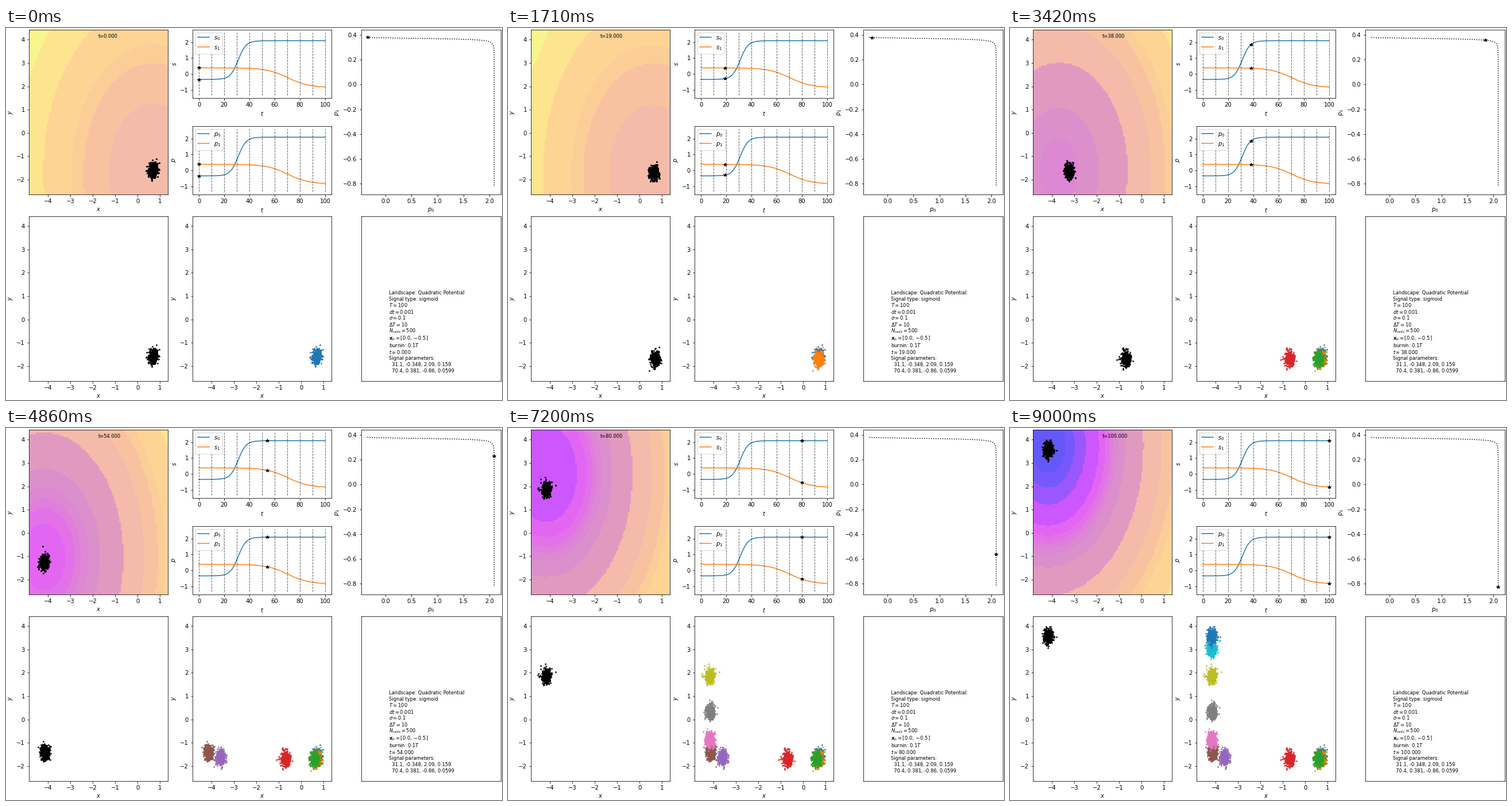
Write a matplotlib script that moves like this. It is 864 px wide and 648 px high and loops after 9.09 s.

```python
import numpy as np
import matplotlib.pyplot as plt
from matplotlib.animation import FuncAnimation
from matplotlib.colors import BoundaryNorm, ListedColormap

W, H, DPI = 864, 648, 72
T, N_CELLS, SIGMA, SAVE_EVERY, BURNIN = 100, 500, 0.1, 10, 10
STIFF = np.array([1 / 2, 2 / 9])
SIGNALS = [(31.1, -0.348, 2.09, 0.159), (70.4, 0.381, -0.86, 0.0599)]
XLIM, YLIM = (-4.86, 1.36), (-2.64, 4.43)
SMALL = 8.33

LEVELS = [-99, -5.75, -5.55, -5.2, -4.6, -4.25, -4.0, -3.8, -3.5, -2.9,
          -1.35, 0.53, 2.0, 2.9, 5.6, 9.0, 99]
BANDS = ["#6458f8", "#7758fc", "#9a57fe", "#cc57ff", "#e366f3", "#e372e8",
         "#e07edc", "#dc88d2", "#dc90cb", "#e19abf", "#e8a5b6", "#f4baaa",
         "#f8c3a0", "#fbcd98", "#fde48f", "#f9f58e"]
BANDS[11:] = ["#f4baaa", "#f8c2a0", "#fbce98", "#fdd494", "#fde48f", "#f9f58e"]
BANDS = BANDS[:10] + BANDS[11:]


def signal(t):
    """Sigmoidal signals at time t, stacked on the last axis."""
    return np.stack([a + (b - a) * 0.5 * (1 + np.tanh(r * (t - tc)))
                     for tc, a, b, r in SIGNALS], axis=-1)


def simulate(h=0.1):
    """Cell positions at t = 0, 1, ..., T, after a burn-in at the first signal."""
    rng = np.random.default_rng(5)
    decay = np.exp(-STIFF * h)
    noise = SIGMA * np.sqrt((1 - decay ** 2) / (2 * STIFF))
    cells = np.tile([0.0, -0.5], (N_CELLS, 1))
    states = []
    per_unit = round(1 / h)
    for i in range(-BURNIN * per_unit, T * per_unit + 1):
        if i >= 0 and i % per_unit == 0:
            states.append(cells)
        goal = -signal(max(i * h, 0.0)) / STIFF
        cells = goal + (cells - goal) * decay + noise * rng.standard_normal(cells.shape)
    return states


def potential(t):
    p = signal(t)
    return gx ** 2 / 4 + gy ** 2 / 9 + p[0] * gx + p[1] * gy


def panel(left, top, right, bottom, xlabel="", ylabel=""):
    ax = fig.add_axes([left / W, 1 - bottom / H, (right - left) / W, (bottom - top) / H])
    ax.set_xlabel(xlabel)
    ax.set_ylabel(ylabel)
    return ax


def plane(left, top, right, bottom):
    ax = panel(left, top, right, bottom, "$x$", "$y$")
    ax.set(xlim=XLIM, ylim=YLIM)
    return ax


def dots(ax, color, alpha=1.0):
    return ax.plot([], [], ".", ms=4, color=color, alpha=alpha)[0]


def time_series(ax, name):
    for i in range(2):
        ax.plot(times, curve[:, i], label=f"${name}_{i}$")
    ax.vlines(range(0, T + 1, SAVE_EVERY), curve.min() - 0.5, curve.max() + 0.5,
              colors="k", linestyles="--", lw=1, alpha=0.6)
    ax.legend(loc="upper left")
    return ax.plot([], [], "k*", ms=6, zorder=4)[0]


fig = plt.figure(figsize=(W / DPI, H / DPI), dpi=DPI)
times = np.linspace(0, T, 1001)
curve = signal(times)
states = simulate()

# Landscape with cells
land_ax = plane(40, 3, 282, 290)
bins = (np.arange(100) + 0.5) / 100
gx, gy = np.meshgrid(XLIM[0] + bins * np.ptp(XLIM), YLIM[0] + bins * np.ptp(YLIM))
land = land_ax.imshow(potential(0), origin="lower", extent=XLIM + YLIM, aspect="auto",
                      interpolation="nearest", cmap=ListedColormap(BANDS),
                      norm=BoundaryNorm(LEVELS, len(BANDS)) if len(BANDS) == len(LEVELS) - 1
                      else BoundaryNorm(LEVELS[:len(BANDS)] + [99], len(BANDS)))
live = dots(land_ax, "k")
clock = land_ax.text(0.5, 0.95, "", transform=land_ax.transAxes, fontsize=SMALL)

# Signals and parameters over time
s_stars = time_series(panel(325, 3, 567, 122, "$t$", "$s$"), "s")
p_stars = time_series(panel(325, 171, 567, 290, "$t$", "$p$"), "p")

# Parameter path
path_ax = panel(618.5, 3, 861.5, 290, "$p_0$", "$p_1$")
path_ax.plot(curve[:, 0], curve[:, 1], "k:")
path_star, = path_ax.plot([], [], "k*", ms=6)

# Saved snapshots
latest = dots(plane(40, 328, 282, 614.5), "k", 0.75)
history_ax = plane(325, 328, 567, 614.5)
history = [dots(history_ax, f"C{i % 10}", 0.75) for i in range(T // SAVE_EVERY + 1)]

# Run description
info_ax = panel(618.5, 328, 861.5, 614.5)
info_ax.set(xticks=[], yticks=[])
INFO = [(464, "Landscape: Quadratic Potential"), (475, "Signal type: sigmoid"),
        (485.5, "$T=100$"), (497.5, "$dt=0.001$"), (508.5, r"$\sigma=0.1$"),
        (519.5, r"$\Delta T=10$"), (530.5, "$N_{cells}=500$"),
        (543.5, r"$\mathbf{x}_0=[0.0, -0.5]$"), (556.5, "burnin: $0.1T$"),
        (567.5, ""), (578.5, "Signal parameters:"),
        (589.5, "  31.1, -0.348, 2.09, 0.159"), (600, "  70.4, 0.381, -0.86, 0.0599")]
lines = [fig.text(667 / W, 1 - y / H, s, fontsize=SMALL) for y, s in INFO]
info_clock = lines[9]


def update(t):
    p = signal(t)
    land.set_data(potential(t))
    live.set_data(*states[t].T)
    clock.set_text(f"t={t:.3f}")
    info_clock.set_text(f"$t={t:.3f}$")
    for stars in (s_stars, p_stars):
        stars.set_data([t, t], p)
    path_star.set_data([p[0]], [p[1]])
    saved = t // SAVE_EVERY
    latest.set_data(*states[saved * SAVE_EVERY].T)
    for i, snap in enumerate(history):
        snap.set_data(*(states[i * SAVE_EVERY].T if i <= saved else ([], [])))


anim = FuncAnimation(fig, update, frames=T + 1, interval=90, repeat=True,
                     repeat_delay=0, blit=False)
plt.show()
```
